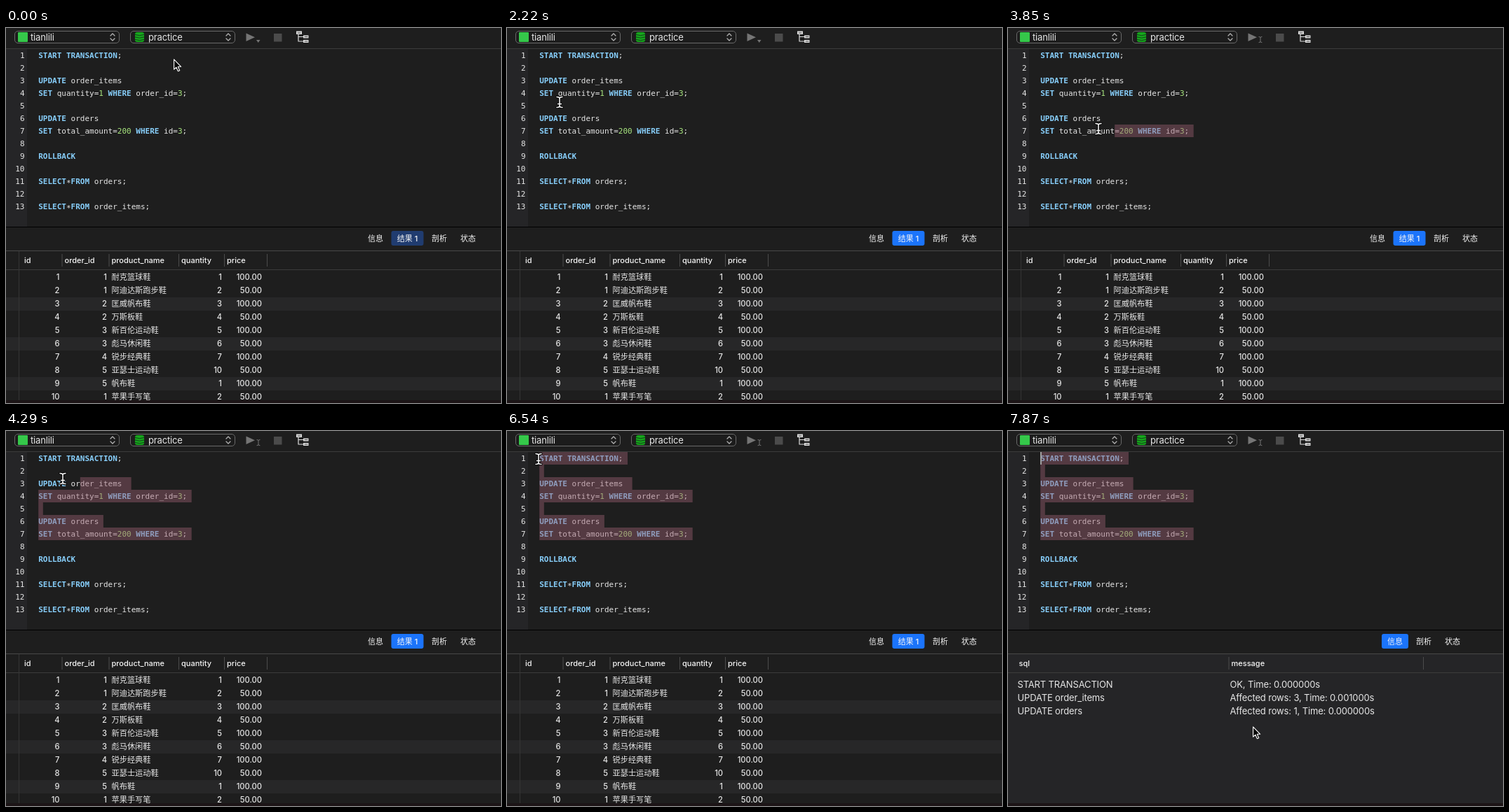
These frames come from a looping animation (706x536 px, 8000 ms). An HTML page:

```html
<!DOCTYPE html>
<html lang="zh-CN">
<head>
<meta charset="utf-8">
<title>SQL transaction</title>
<style>
  html, body { margin: 0; width: 100%; height: 100%; overflow: hidden; background: #1e1e1e; }
  svg { display: block; width: 706px; height: 536px; }
  text { white-space: pre; fill: #e6e6e6; font: 11px Inter, "Noto Sans CJK SC", "Noto Sans CJK", sans-serif; }
  .code { font: 11px "DejaVu Sans Mono", monospace; }
  .kw { fill: #87cefa; font-weight: bold; }
  .num { fill: #a9e77f; }
  .star { baseline-shift: -2px; }
  .bar { font-size: 13px; letter-spacing: -.15px; }
  .head, .tab { font-weight: 500; fill: #f6f6f6; }
  .cell { font-size: 11.2px; font-weight: 500; }
</style>
</head>
<body>
<svg id="stage" viewBox="0 0 706 536"></svg>
<script>
const NS = 'http://www.w3.org/2000/svg';
const stage = document.getElementById('stage');
const LOOP = 8000, STEP = 148.5, LEFT = 46.2, CHAR = 6.622, TOP = 30, ROW = 18;

function add(parent, tag, attrs, content) {
  const el = document.createElementNS(NS, tag);
  for (const k in attrs) el.setAttribute(k, attrs[k]);
  if (content !== undefined) el.textContent = content;
  parent.appendChild(el);
  return el;
}
const group = (parent = stage) => add(parent, 'g', {});
const rect = (p, x, y, width, height, fill, rx = 0) => add(p, 'rect', { x, y, width, height, fill, rx });
const path = (p, d, fill, stroke = 'none', w = 1) =>
  add(p, 'path', { d, fill, stroke, 'stroke-width': w, 'stroke-linejoin': 'round', 'stroke-linecap': 'round' });
const label = (p, x, y, str, cls, anchor = 'start') =>
  add(p, 'text', { x, y, class: cls, 'text-anchor': anchor }, str);
const show = (el, on) => el.setAttribute('visibility', on ? 'inherit' : 'hidden');

// Toolbar
rect(stage, 0, 0, 706, 536, '#1e1e1e');
rect(stage, 0, 29, 706, 1, '#3b3b3b');
function select(x, width, textX, str) {
  add(stage, 'rect', { x: x + .5, y: 4.5, width, height: 17, rx: 4.5, fill: '#1c1c1c', stroke: '#696969' });
  label(stage, textX, 18, str, 'bar');
  const c = x + width - 9;
  path(stage, `M${c - 3} 11l3-3 3 3M${c - 3} 15l3 3 3-3`, 'none', '#b4b4b4', 1.2);
}
select(12, 149, 35, 'tianlili');
select(177, 149, 203, 'practice');
rect(stage, 17, 6, 14, 14, '#35c84a', 1);
rect(stage, 184, 6, 13, 14, '#16a51c', 3);
for (let y = 9.5; y < 18; y += 3.5) path(stage, `M184 ${y}q6.5 2.6 13 0`, 'none', '#12401a');

const play = path(stage, 'M342.5 7.5v11.5l12.5-5.75z', '#757575');
const drop = path(stage, 'M357 17h5.5l-2.75 4z', '#757575');
const runSel = path(stage, 'M358 12.5q2 0 2 1.3q0-1.3 2-1.3M360 13.8v5.6M358 20.7q2 0 2-1.3q0 1.3 2 1.3', 'none', '#757575');
const stop = rect(stage, 382, 8, 11.5, 11.5, '#4b4b4b');
const tree = group();
path(tree, 'M414 4.5h8v4.5h-8zM424 10.5h7.5v4h-7.5zM424 17h7.5v4h-7.5z', 'currentColor');
path(tree, 'M417 9v10h7M417 12.5h7', 'none', 'currentColor', 1.2);
path(tree, 'M416 7h4M426 12.5h4M426 19h4', 'none', '#1e1e1e', .8);

// Editor
rect(stage, 0, TOP, 30, 254, '#252527');
const code = `START TRANSACTION;

UPDATE order_items${' '}
SET quantity=1 WHERE order_id=3;

UPDATE orders
SET total_amount=200 WHERE id=3;

ROLLBACK

SELECT*FROM orders;

SELECT*FROM order_items;`.split('\n');
const tokenClass = s => /^[A-Z]/.test(s) ? 'kw' : /^\d/.test(s) ? 'num' : s === '*' ? 'star' : '';
code.forEach((line, i) => {
  const y = TOP + 13 + i * ROW;
  label(stage, 26.5, y, i + 1, 'code', 'end');
  const row = label(stage, LEFT, y, '', 'code');
  for (const part of line.match(/[A-Z]+|\d+|\*|[^A-Z\d*]+/g) || [])
    add(row, 'tspan', { class: tokenClass(part) }, part);
});
const marks = code.slice(0, 7).map((_, i) =>
  rect(stage, LEFT, TOP + i * ROW, 0, ROW, 'rgba(153,94,112,.44)'));
const caret = rect(stage, 46, TOP, 2, ROW, '#a0a0a0');
rect(stage, 0, 284, 706, 1, '#000');

// Result panes
function pane(bg, tabs, tabX, heads) {
  const g = group();
  rect(g, 0, 285, 706, 34, '#1e1e1e');
  rect(g, 0, 319, 706, 213, bg);
  rect(g, 0, 318, 706, 1, '#484848');
  rect(g, 0, 345, 706, 1, '#3c3c3c');
  const [x, width] = tabX;
  const tab = rect(g, x, 290, width, 21, '#1b74fb', 3);
  tabs.forEach(([cx, str]) => label(g, cx, 305, str, 'tab', 'middle'));
  heads.forEach(([hx, str], i) => {
    label(g, hx, 336, str, 'head');
    if (i) rect(g, hx - 4, 323, 1, 18, '#4c4c4c');
  });
  return { g, tab };
}

const { g: grid, tab: gridTab } = pane('#1e1e1e',
  [[527, '信息'], [572.5, '结果 1'], [618, '剖析'], [659, '状态']], [549.5, 46],
  [[26, 'id'], [83.5, 'order_id'], [150.5, 'product_name'], [250, 'quantity'], [315, 'price'], [376, '']]);
const items = `1 耐克篮球鞋 1
1 阿迪达斯跑步鞋 2
2 匡威帆布鞋 3
2 万斯板鞋 4
3 新百伦运动鞋 5
3 彪马休闲鞋 6
4 锐步经典鞋 7
5 亚瑟士运动鞋 10
5 帆布鞋 1
1 苹果手写笔 2`;
items.split('\n').forEach((item, i) => {
  const y = 360 + i * 19;
  const [order, name, count] = item.split(' ');
  if (i % 3 === 2) rect(grid, 0, y - 13, 706, 19, '#272728');
  label(grid, 150.5, y, name, 'cell');
  [[76.5, i + 1], [144, order], [308, count], [365, i % 2 ? '50.00' : '100.00']]
    .forEach(([x, str]) => label(grid, x, y, str, 'cell', 'end'));
});
rect(grid, 18, 319, 1, 213, '#353535');

const { g: log } = pane('#252527',
  [[552, '信息'], [593, '剖析'], [634, '状态']], [533, 38],
  [[15.5, 'sql'], [318.5, 'message'], [596, '']]);
const messages = `START TRANSACTION|OK, Time: 0.000000s
UPDATE order_items|Affected rows: 3, Time: 0.001000s
UPDATE orders|Affected rows: 1, Time: 0.000000s`;
messages.split('\n').forEach((line, i) => line.split('|').forEach((str, col) =>
  label(log, 13.5 + col * 303, 367 + i * 19, str, 'bar')));
rect(stage, 0, 532, 706, 4, '#1c1416');

// Pointers
const arrow = group();
path(arrow, 'M.6.8v14.4l3.3-3 2.5 5.5 2.3-1-2.4-5.4h4.4z', '#000', '#fff', 1.1);
const beam = group();
const beamShape = 'M-4-7.5Q0-7.5 0-5Q0-7.5 4-7.5M0-5V5M-4 7.5Q0 7.5 0 5Q0 7.5 4 7.5M-2.5 2.5H2.5';
path(beam, beamShape, 'none', '#000', 3.4);
path(beam, beamShape, 'none', '#fff', 1.5);

// Pointer route: time, x, y
const route = [
  [0, 239, 44], [300, 257, 51], [440, 257, 51], [1180, 45, 46], [1930, 43, 45],
  [2520, 107, 165], [3110, 235, 172], [3260, 235, 172], [3850, 130, 147], [4140, 106, 76],
  [4290, 83, 69], [4590, 46, 50], [5190, 46, 50], [5490, 45, 40], [7290, 45, 40], [7870, 349, 422]
];
const ACTIVE = 1180, DRAG = 3260, DROP = 5600, RUN = 7140, DONE = 7290;
const clicks = [1480, 2650, DROP];

function pointerAt(t) {
  const i = route.findLastIndex(p => p[0] <= t);
  const [t0, x0, y0] = route[i], [t1, x1, y1] = route[i + 1] || [LOOP, x0, y0];
  const k = (t - t0) / (t1 - t0);
  return { x: x0 + (x1 - x0) * k, y: y0 + (y1 - y0) * k };
}

// The selection trails the pointer by one step
function selectionAt(t) {
  if (t < DRAG) return { line: 8, col: 0 };
  const { x, y } = pointerAt(Math.min(t, DROP) - STEP);
  return { line: 1 + Math.floor((y - TOP) / ROW), col: Math.max(0, Math.round((x - LEFT) / CHAR)) };
}

function caretLine(t) {
  const click = clicks.findLast(c => c <= t);
  const dragging = t >= DRAG && t < DROP;
  if (!click || dragging || (t - click) % 1000 >= 500) return 0;
  return click === clicks[1] ? 8 : 1;
}

function draw(t) {
  const now = Math.floor((t + 17) / STEP) * STEP;
  const { x, y } = pointerAt(now);
  const isBeam = t >= ACTIVE && y < 284;
  show(beam, isBeam);
  show(arrow, !isBeam);
  (isBeam ? beam : arrow).setAttribute('transform', `translate(${Math.round(x)} ${Math.round(y)})`);

  const { line, col } = selectionAt(now);
  marks.forEach((m, i) => {
    const from = i + 1 === line ? Math.min(col, code[i].length) : 0;
    show(m, i + 1 >= line);
    m.setAttribute('x', LEFT + from * CHAR);
    m.setAttribute('width', (code[i].length + 1 - from) * CHAR);
  });
  show(drop, line > 7);
  show(runSel, line <= 7);

  const at = caretLine(t);
  show(caret, at > 0);
  caret.setAttribute('y', TOP + Math.max(0, at - 1) * ROW);

  const running = t >= RUN && t < DONE;
  const dim = running ? '#484848' : '#757575';
  show(grid, t < RUN);
  show(log, t >= DONE);
  gridTab.setAttribute('fill', t < ACTIVE ? '#203c70' : '#1b74fb');
  play.setAttribute('fill', dim);
  runSel.setAttribute('stroke', dim);
  stop.setAttribute('fill', running ? '#757575' : '#4b4b4b');
  tree.setAttribute('color', running ? '#6c6c6c' : '#dedede');
}

const start = performance.now();
function tick() {
  draw((performance.now() - start) % LOOP);
  requestAnimationFrame(tick);
}
draw(0);
requestAnimationFrame(tick);
</script>
</body>
</html>
```
